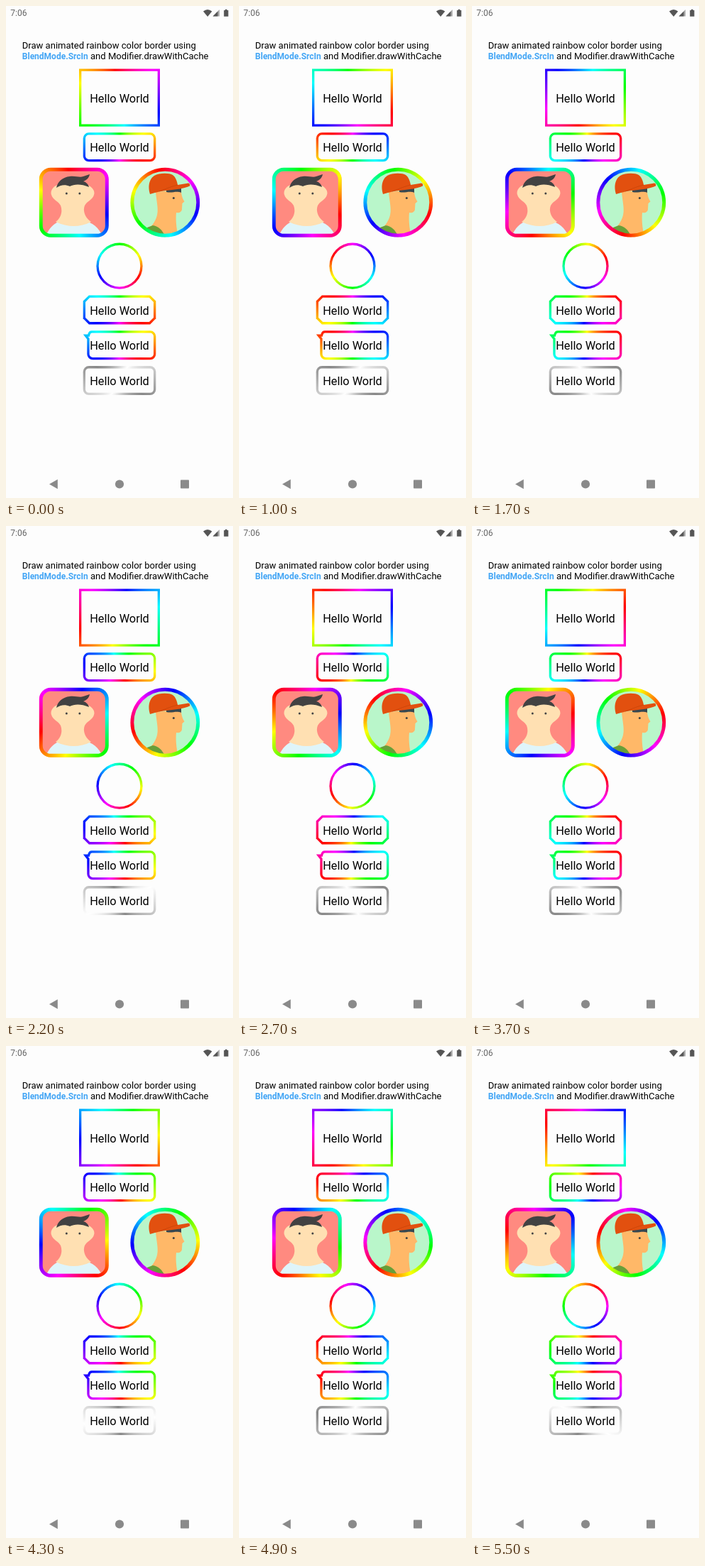
Animation, 320 px wide and 693 px high, one loop 5600 ms. Source, as an HTML page with a canvas:

```html
<!DOCTYPE html>
<html lang="en">
<head>
<meta charset="utf-8">
<title>Rainbow borders</title>
<style>
  html, body { margin: 0; width: 100%; height: 100%; overflow: hidden; background: #fdfdfd; }
  svg, canvas { position: absolute; left: 0; top: 0; width: 320px; height: 693px; display: block; }
  text { font-family: Roboto, sans-serif; font-size: 13.04px; fill: #000; white-space: pre; }
  .hello text { font-size: 16.3px; text-anchor: middle; }
  .clock { font-size: 12px; fill: #666; }
  .key { font-size: 12px; font-weight: 700; fill: #42a5f5; }
</style>
</head>
<body>
<svg viewBox="0 0 320 693">
  <defs>
    <clipPath id="tile"><rect x="47" y="228" width="97.5" height="97.5" rx="16.3"/></clipPath>
    <clipPath id="disc"><circle cx="224.3" cy="276.7" r="48.5"/></clipPath>
  </defs>

  <text class="clock" x="6.3" y="14.2">7:06</text>
  <g fill="#555">
    <path d="M278 7.6Q284.2 2.4 290.4 7.6L284.2 15Z"/>
    <path d="M301 5V14.6H291.6Z" fill="#aaa"/>
    <path d="M298.5 7.5V14.6H291.6Z"/>
    <path d="M307.2 6H309V4.8H311.6V6H313.4V14.8H307.2Z"/>
  </g>

  <text x="22.8" y="59.8">Draw animated rainbow color border using</text>
  <text x="22.8" y="75"><tspan class="key">BlendMode.SrcIn</tspan> and Modifier.drawWithCache</text>

  <g clip-path="url(#tile)">
    <rect x="47" y="228" width="98" height="98" fill="#ff8a80"/>
    <path d="M56 324C60 314 68 304 79 303H110C122 304 131 313 136 324Z" fill="#dff5fa"/>
    <path d="M73 252C66 254 62 261 64 266C66 273 74 275 77 281C80 289 78 298 70 304C79 308 87 310 95 310C104 310 112 308 120 304C111 298 108 288 111 281C114 275 122 273 124 266C126 260 121 254 114 252C102 247 84 247 73 252Z" fill="#ffe0b2"/>
    <path d="M71 256C73 247 80 241 90 240C98 239 104 242 109 240C112 239 115 238 118 237C117 242 114 245 109 247C113 248 116 251 117 255C105 250 96 251 90 254C83 251 77 252 71 256Z" fill="#424242"/>
    <circle cx="85.3" cy="264" r="1.5" fill="#424242"/>
    <circle cx="103.8" cy="264" r="1.5" fill="#424242"/>
  </g>

  <g clip-path="url(#disc)">
    <circle cx="224.3" cy="276.7" r="48.5" fill="#b9f6ca"/>
    <path d="M211 262C212 275 216 288 212 298C210 304 206 309 201 314L223 326H243C240 312 239 301 240 291C244 292 248 290 248 286L248.500 278L251.500 275.500C249 271 247 267 247 259Z" fill="#ffb868"/>
    <path d="M199 312L207 309C214 310 220 314 225 326H199Z" fill="#689f38"/>
    <path d="M226 259L247 256V263C240 260 234 264 226 262Z" fill="#37474f"/>
    <path d="M203 265C200 256 201 244 209 239C216 235 230 235 235 238C239 241 241 246 242 252L257 249.500Q260 250 259 253.500C252 257 243 258 234 259C222 260 212 262 203 265Z" fill="#e2500f"/>
    <path d="M216 261C226 257 234 254 242 252" fill="none" stroke="#c94409" stroke-width=".8"/>
    <circle cx="236.300" cy="270.500" r="1.500" fill="#424242"/>
  </g>

  <g class="hello">
    <text x="160" y="135.800">Hello World</text>
    <text x="160" y="205.200">Hello World</text>
    <text x="160" y="434.500">Hello World</text>
    <text x="160" y="484.200">Hello World</text>
    <text x="160" y="533.800">Hello World</text>
  </g>

  <g fill="#8a8a8a">
    <path d="M61 673.500L72.800 666.800V680.200Z"/>
    <circle cx="160" cy="673.500" r="6.100"/>
    <rect x="246" y="667.500" width="12" height="12" rx=".8"/>
  </g>
</svg>
<canvas id="borders"></canvas>

<script>
const LOOP = 5600, STEP = 100, START = 2170;
const RAINBOW = ['#f00', '#f0f', '#00f', '#0ff', '#0f0', '#ff0', '#f00'];
const SILVER = ['#888', '#fff', '#888', '#fff', '#888'];

const canvas = document.getElementById('borders');
const ctx = canvas.getContext('2d');
const scale = window.devicePixelRatio || 1;
canvas.width = Math.round(320 * scale);
canvas.height = Math.round(693 * scale);

function roundBox(x, y, w, h, r) {
  const p = new Path2D();
  p.roundRect(x, y, w, h, r);
  return p;
}

function disc(x, y, r) {
  const p = new Path2D();
  p.arc(x, y, r, 0, Math.PI * 2);
  return p;
}

function cutBox(x, y, w, h, c) {
  const r = x + w, b = y + h;
  return new Path2D(`M${x + c} ${y}H${r - c}L${r} ${y + c}V${b - c}L${r - c} ${b}H${x + c}L${x} ${b - c}V${y + c}Z`);
}

const bubble = new Path2D('M121 457.300H203.300a8 8 0 0 1 8 8V490.300a8 8 0 0 1 -8 8H122.300a8 8 0 0 1 -8 -8V469.500L108.800 462.500H115.200Q116.500 457.300 121 457.300Z');

const row = y => roundBox(108.7, y, 102.6, 41, 8.15);
const border = (path, cx, cy, width, period, colors = RAINBOW) =>
  ({ path, cx, cy, width, period, colors });

const borders = [
  border(roundBox(103, 88.4, 114, 81.4, 0), 160, 129.1, 3.3, 3000),
  border(row(178.3), 160, 198.8, 3.3, 2000),
  border(roundBox(46.8, 227.8, 97.9, 97.9, 16.3), 95.7, 276.7, 4.9, 3000),
  border(disc(224.3, 276.7, 48.9), 224.3, 276.7, 4.9, 3000),
  border(disc(160, 366.2, 32.6), 160, 366.2, 3.3, 2000),
  border(cutBox(108.7, 407.4, 102.6, 41, 8.15), 160, 427.9, 3.3, 2000),
  border(bubble, 160, 477.8, 3.3, 2000),
  border(row(507.1), 160, 527.6, 3.3, 2000, SILVER)
];

// The outer half of each double-width stroke is clipped away.
function drawBorder(b, time) {
  const turn = (time % b.period) / b.period;
  const sweep = ctx.createConicGradient(turn * Math.PI * 2, b.cx, b.cy);
  b.colors.forEach((c, i) => sweep.addColorStop(i / (b.colors.length - 1), c));
  ctx.save();
  ctx.clip(b.path);
  ctx.strokeStyle = sweep;
  ctx.lineWidth = b.width * 2;
  ctx.stroke(b.path);
  ctx.restore();
}

function render(now) {
  const time = START + Math.floor((now % LOOP) / STEP) * STEP;
  ctx.setTransform(scale, 0, 0, scale, 0, 0);
  ctx.clearRect(0, 0, 320, 693);
  borders.forEach(b => drawBorder(b, time));
}

function tick() {
  render(performance.now());
  requestAnimationFrame(tick);
}
tick();
</script>
</body>
</html>
```
